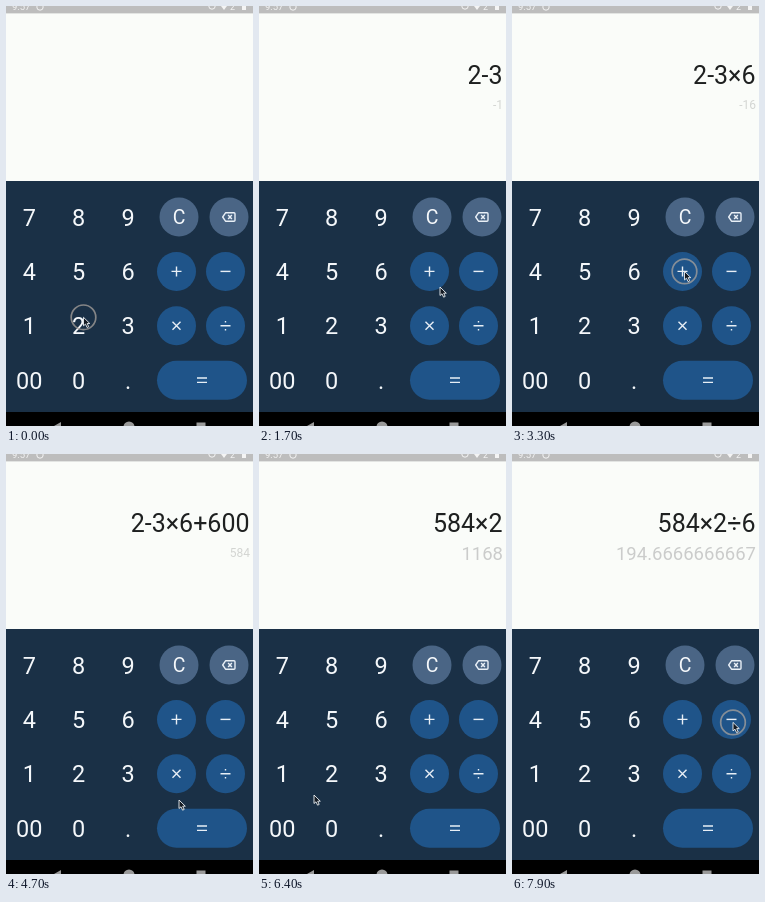
Animation of 247x420 px, one loop 8 s. Source, as an HTML page:

```html
<!DOCTYPE html>
<html lang="en">
<head>
<meta charset="utf-8">
<title>Calculator</title>
<style>
  html, body { margin: 0; width: 100%; height: 100%; overflow: hidden; background: #1a3046; }
  svg { display: block; width: 247px; height: 420px; }
  text { font-family: Roboto, "Liberation Sans", sans-serif; }
  .key { fill: #f4f7fa; font-size: 23.5px; text-anchor: middle; }
  .line { fill: none; stroke: #e8eff6; stroke-width: 1.4; stroke-linejoin: round; }
  #expr { font-size: 25px; fill: #1e2020; text-anchor: end; }
  #preview { text-anchor: end; }
</style>
</head>
<body>
<svg viewBox="0 0 247 420">
  <rect width="247" height="420" fill="#1a3046"/>
  <rect y="7" width="247" height="168" fill="#fafcf9"/>
  <rect width="247" height="7.4" fill="#bdbdbd"/>
  <g fill="#f4f4f4">
    <text x="6" y="4" font-size="9.5">9:57</text>
    <path d="M215 0h6l-3 4zM236 0h4v4h-4z"/>
    <text x="224" y="4" font-size="9">2</text>
  </g>
  <g fill="none" stroke="#f4f4f4">
    <circle cx="34" cy="1" r="3.2"/>
    <circle cx="206" cy="0" r="3.2"/>
  </g>
  <text id="expr" x="243.5" y="77.7"/>
  <text id="preview" x="244"/>
  <g id="pad"></g>
  <rect y="406" width="247" height="14" fill="#000"/>
  <g fill="#999">
    <path d="M48 420l7-4v4z"/>
    <circle cx="123" cy="421" r="5.5"/>
    <rect x="190.5" y="416.5" width="9" height="4"/>
  </g>
  <circle id="ring" r="12.3" fill="none" stroke="#a8a29c" stroke-opacity=".75" stroke-width="1.7"/>
  <path id="cursor" d="M0 0V8.5L2 6.8L3.6 10.2L5.2 9.4L3.7 6.2H6.3Z" fill="#141a22" stroke="#eef2f5" stroke-width=".9"/>
</svg>
<script>
const LOOP = 8000, STEP = 100;
const BLUE = "#1f5489", LIT = "#48aaf8", SLATE = "#4a6585";
const $ = id => document.getElementById(id);
const keys = {};

function add(tag, attrs, text) {
  const el = document.createElementNS("http://www.w3.org/2000/svg", tag);
  for (const k in attrs) el.setAttribute(k, attrs[k]);
  if (text) el.textContent = text;
  return $("pad").appendChild(el);
}

function addRound(name, x, y, icon, fill = BLUE, half = 19.5) {
  const face = add("rect", { x: x - half, y: y - 19.5, width: half * 2, height: 39, rx: 19.5, fill });
  add("path", { d: icon, class: "line", transform: `translate(${x} ${y})` });
  keys[name] = { x, y, face };
}

const rowY = r => 211 + r * 54.4;
["7 8 9", "4 5 6", "1 2 3", "00 0 ."].forEach((row, r) =>
  row.split(" ").forEach((name, c) => {
    const x = 23.3 + c * 49.4, y = rowY(r);
    add("text", { x, y: y + 8.6, class: "key" }, name);
    keys[name] = { x, y };
  }));

addRound("C", 173, rowY(0), "", SLATE);
add("text", { x: 173, y: 218, class: "key", style: "font-size:19.5px" }, "C");
addRound("del", 223, rowY(0), "M-6.3 0L-3.5 -4.2H5Q6 -4.2 6 -3.2V3.2Q6 4.2 5 4.2H-3.5ZM-.9 -1.9L2.9 1.9M2.9 -1.9L-.9 1.9", SLATE);
addRound("+", 170.5, rowY(1), "M-5 0H5M0 -5V5");
addRound("-", 219.5, rowY(1), "M-5 0H5");
addRound("×", 170.5, rowY(2), "M-4 -4L4 4M4 -4L-4 4");
addRound("÷", 219.5, rowY(2), "M-5 0H5M0 -4.8V-3.2M0 3.2V4.8");
addRound("=", 196, rowY(3), "M-5 -2.2H5M-5 2.2H5", BLUE, 45);

const taps = "0:2 800:- 1300:3 2000:× 2600:6 3200:+ 3800:6 4300:00 4900:= 5400:× 6000:2 6700:÷ 7300:6 7800:-"
  .split(" ").map(s => s.split(":")).map(([at, key]) => ({ at: +at, key }));
const RESULT_AT = taps.find(tap => tap.key === "=").at + 300;

// Places the pointer passes besides the key centres
const strays = [[0, 77.5, 311.3], [1700, 181, 281], [4700, 173, 346], [5600, 176, 319], [6400, 55, 341], [7900, 221, 268.4]];
const stops = taps.map(({ at, key }) => [at, keys[key].x + 2, keys[key].y])
  .concat(strays).sort((a, b) => a[0] - b[0]);

function pointAt(t) {
  const i = stops.findLastIndex(s => s[0] <= t);
  const a = stops[i], b = stops[i + 1];
  if (!b) return a.slice(1);
  const u = Math.max(0, (t - a[0]) / (b[0] - a[0]) - .4) / .6;
  const e = u * u * (3 - 2 * u);
  return [1, 2].map(k => a[k] + (b[k] - a[k]) * e);
}

function product(term) {
  return term.split(/(?=[×÷])/).reduce((v, part) =>
    part[0] === "×" ? v * part.slice(1) : part[0] === "÷" ? v / part.slice(1) : +part, 0);
}

function evaluate(expr) {
  const sum = expr.split(/(?=[+-])/).reduce((v, term) => {
    const sign = term[0] === "-" ? -1 : 1;
    return v + sign * product(term.replace(/^[+-]/, ""));
  }, 0);
  return String(+sum.toFixed(10));
}

function draw(t) {
  let expr = "", ring = false, lit = "";
  for (const { at, key } of taps) {
    const age = t - at;
    if (age >= 300) expr = key === "=" ? evaluate(expr) : expr + key;
    if (age >= 0 && age < 200) ring = true;
    if (age >= 200 && age < 300) lit = key;
  }
  for (const name of "+-×÷=") keys[name].face.setAttribute("fill", name === lit ? LIT : BLUE);

  const big = t >= RESULT_AT;
  const out = $("preview");
  $("expr").textContent = expr;
  out.textContent = /\D\d+$/.test(expr) ? evaluate(expr) : "";
  out.setAttribute("font-size", big ? 18.5 : 12);
  out.setAttribute("y", big ? 105.5 : 103.3);
  out.setAttribute("fill", big ? "#cbcccb" : "#d3d5d2");

  const place = `translate(${pointAt(t).join(" ")})`;
  $("ring").setAttribute("transform", place);
  $("ring").setAttribute("visibility", ring ? "visible" : "hidden");
  $("cursor").setAttribute("transform", place);
}

const start = performance.now();
function tick() {
  const t = (performance.now() - start) % LOOP;
  draw(Math.floor(t / STEP) * STEP);
  requestAnimationFrame(tick);
}
tick();
</script>
</body>
</html>
```
